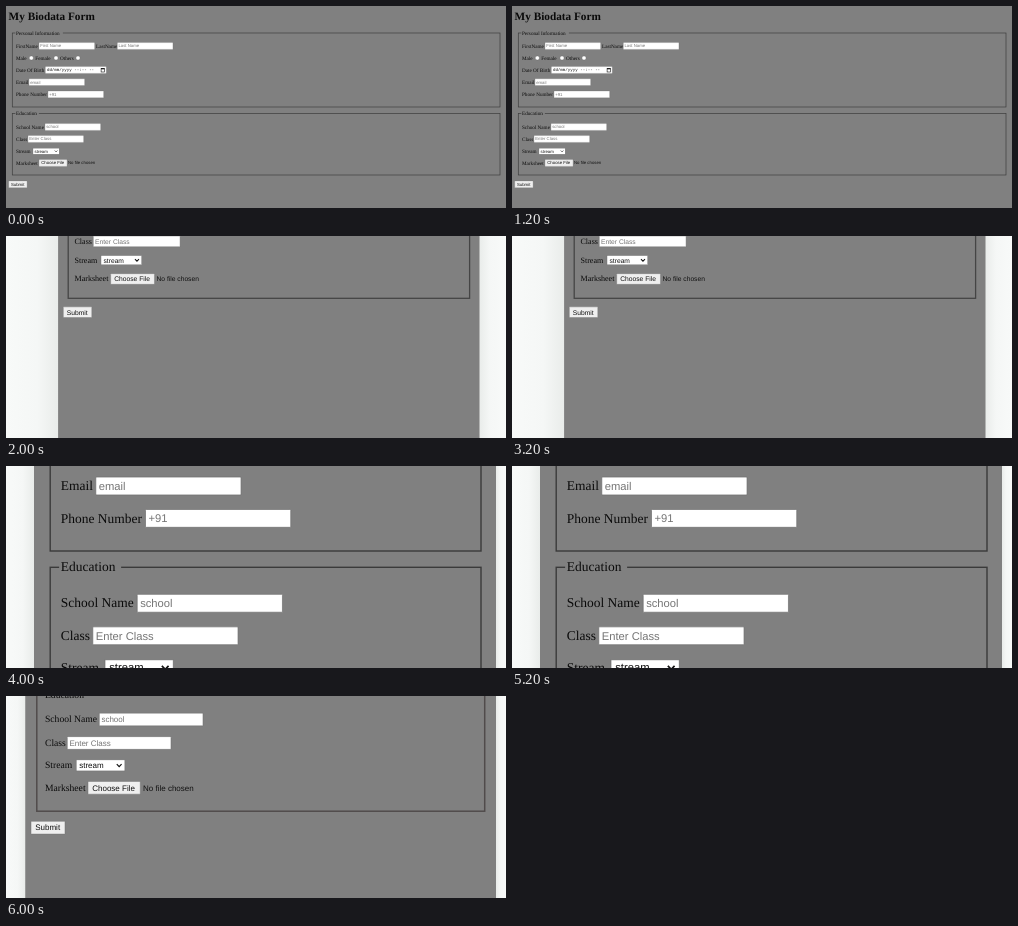
Animation, 500 px wide and 202 px high, one loop 8000 ms. Source, as an HTML page:

```html
<!DOCTYPE html>
<html lang="en">
<head>
<meta charset="utf-8">
<title>Biodata form</title>
<style>
  html, body { margin: 0; width: 100%; height: 100%; overflow: hidden; background: #808080; }
  svg { display: block; width: 500px; height: 202px; }
  text { white-space: pre; text-rendering: geometricPrecision; }
  .serif { font-family: "Liberation Serif", "Times New Roman", serif; fill: #0a0a0a; }
  .sans { font-family: "Liberation Sans", Arial, sans-serif; }
  .mono { font-family: "Liberation Mono", "Courier New", monospace; }
  .view { visibility: hidden; animation: turn 8s step-end infinite; }
  .view:nth-of-type(2) { animation-delay: -6s; }
  .view:nth-of-type(3) { animation-delay: -4s; }
  .view:nth-of-type(4) { animation-delay: -2s; }
  @keyframes turn {
    0% { visibility: visible; }
    25%, 100% { visibility: hidden; }
  }
</style>
</head>
<body>
<svg id="stage" viewBox="0 0 500 202">
  <defs>
    <linearGradient id="shadeL">
      <stop offset="0" stop-color="#f8faf9"/>
      <stop offset=".6" stop-color="#f5f7f6"/>
      <stop offset="1" stop-color="#e9ecea"/>
    </linearGradient>
    <linearGradient id="shadeR">
      <stop offset="0" stop-color="#e9ecea"/>
      <stop offset=".4" stop-color="#f5f7f6"/>
      <stop offset="1" stop-color="#f8faf9"/>
    </linearGradient>
  </defs>
</svg>
<script>
const stage = document.getElementById('stage');
let s = 1;      // scale of the page
let left = 0;   // where the labels begin

const rect = (x, y, w, h, fill, more = '') =>
  `<rect x="${x}" y="${y}" width="${w}" height="${h}" fill="${fill}" ${more}/>`;

const text = (str, x, y, size, cls, fill) =>
  `<text x="${x}" y="${y}" font-size="${size}" class="${cls}"${fill ? ` style="fill:${fill}"` : ''}>${str}</text>`;

const label = (str, y, x = left) => text(str, x, y + 4.9 * s, 16 * s, 'serif');

const small = (str, x, y, fill = '#111') => text(str, x, y + 4.6 * s, 13.333 * s, 'sans', fill);

const box = (x, y, w, fill = '#fff', line = '#6c6c6c') =>
  rect(x, y - 10.6 * s, w, 21.2 * s, fill, `stroke="${line}" stroke-width="${s * .8}" rx="${s}"`);

const input = (x, y, hint) => box(x, y, 172.5 * s) + small(hint, x + 3.5 * s, y, '#757575');

const field = (name, y, x, hint) => label(name, y) + input(x, y, hint);

const chevron = (x, y) =>
  `<path d="M${x - 4 * s} ${y - 2 * s}l${4 * s} ${4 * s}l${4 * s} ${-4 * s}" fill="none" stroke="#111" stroke-width="${2 * s}"/>`;

const select = (y, x) => {
  const w = 81 * s;
  return label('Stream', y) + rect(x, y - 9.2 * s, w, 18.4 * s, '#fff', `stroke="#6c6c6c" stroke-width="${s * .8}"`) +
    small('stream', x + 5 * s, y) + chevron(x + w - 9.5 * s, y);
};

const button = (str, x, y, w) =>
  box(x, y, w, '#efefef', '#707070') + small(str, x + 7 * s, y);

const file = (y, x, noteX) =>
  label('Marksheet', y) + button('Choose File', x, y, 87 * s) + small('No file chosen', noteX, y);

const radio = (x, y) =>
  `<circle cx="${x}" cy="${y}" r="${6.5 * s}" fill="#fff" stroke="#666" stroke-width="${s}"/>`;

const fieldset = (x, top, right, bottom, width, color, legend, gap) =>
  rect(x, top, right - x, bottom - top, 'none', `stroke="${color}" stroke-width="${width}"`) +
  rect(left - 2 * s, top - 2, gap, 4, '#808080') + label(legend, top);

const page = (x, right) =>
  rect(0, 0, x, 202, 'url(#shadeL)') + rect(right, 0, 500 - right, 202, 'url(#shadeR)') +
  rect(x, 0, right - x, 202, '#808080');

const date = (y, x) => {
  const w = 61, icon = x + w - 5.2;
  return label('Date Of Birth', y) + box(x, y, w) +
    text('dd/mm/yyyy --:-- --', x + 1.6, y + 1.4, 4.15, 'mono', '#111') +
    rect(icon, y - 1.6, 3.3, 3.6, 'none', 'stroke="#111" stroke-width=".6"') +
    rect(icon, y - 1.8, 3.3, 1.1, '#111');
};

function whole() {
  s = .3226; left = 10;
  return rect(0, 0, 500, 202, '#808080') +
    text('My Biodata Form', 2.6, 14, 11.25, 'serif" font-weight="bold') +
    fieldset(6.3, 27, 494, 101, .7, '#3c3c3c', 'Personal Information', 47.5) +
    field('FirstName', 40, 33, 'First Name') +
    label('LastName', 40, 90) + input(111.3, 40, 'Last Name') +
    label('Male', 52) + radio(25.3, 52) +
    label('Female', 52, 29.3) + radio(50, 52) +
    label('Others', 52, 54) + radio(72, 52) +
    date(64, 39.3) +
    field('Email', 76.2, 23, 'email') +
    field('Phone Number', 88.4, 42, '+91') +
    fieldset(6.3, 107.5, 494, 169, .7, '#3c3c3c', 'Education', 23.5) +
    field('School Name', 121, 39, 'school') +
    field('Class', 133, 22, 'Enter Class') +
    select(145.2, 27) +
    file(157, 33, 62) +
    button('Submit', 2.7, 178.3, 18.4);
}

function lower() {
  s = .503; left = 68.5;
  return page(52.3, 473.3) +
    fieldset(62.2, -50, 463.6, 62.3, 1.3, '#454545', 'Education', 40) +
    field('Class', 5.4, 87.3, 'Enter Class') +
    select(24.2, 95) +
    file(43, 104.7, 150.5) +
    button('Submit', 57.3, 76.2, 28.5);
}

function middle() {
  s = .842; left = 54.8;
  return page(28, 490) +
    fieldset(44.2, -200, 475, 85, 1.4, '#3a3a3a', 'Personal Information', 124) +
    field('Email', 20, 89.8, 'email') +
    field('Phone Number', 52.4, 139.5, '+91') +
    fieldset(44.2, 101.3, 475, 290, 1.4, '#3a3a3a', 'Education', 62) +
    field('School Name', 137.3, 131.2, 'school') +
    field('Class', 169.8, 86.8, 'Enter Class') +
    select(201.6, 99);
}

function end() {
  s = .601; left = 39;
  return page(19.5, 490) +
    fieldset(30.8, -1.2, 478.7, 115.2, 1.5, '#504b4b', 'Education', 44) +
    field('School Name', 23.5, 93.3, 'school') +
    field('Class', 47, 61.3, 'Enter Class') +
    select(69.4, 70.2) +
    file(91.8, 82, 137) +
    button('Submit', 25, 131.7, 34);
}

stage.insertAdjacentHTML('beforeend',
  [whole, lower, middle, end].map(draw => `<g class="view">${draw()}</g>`).join(''));
</script>
</body>
</html>
```
